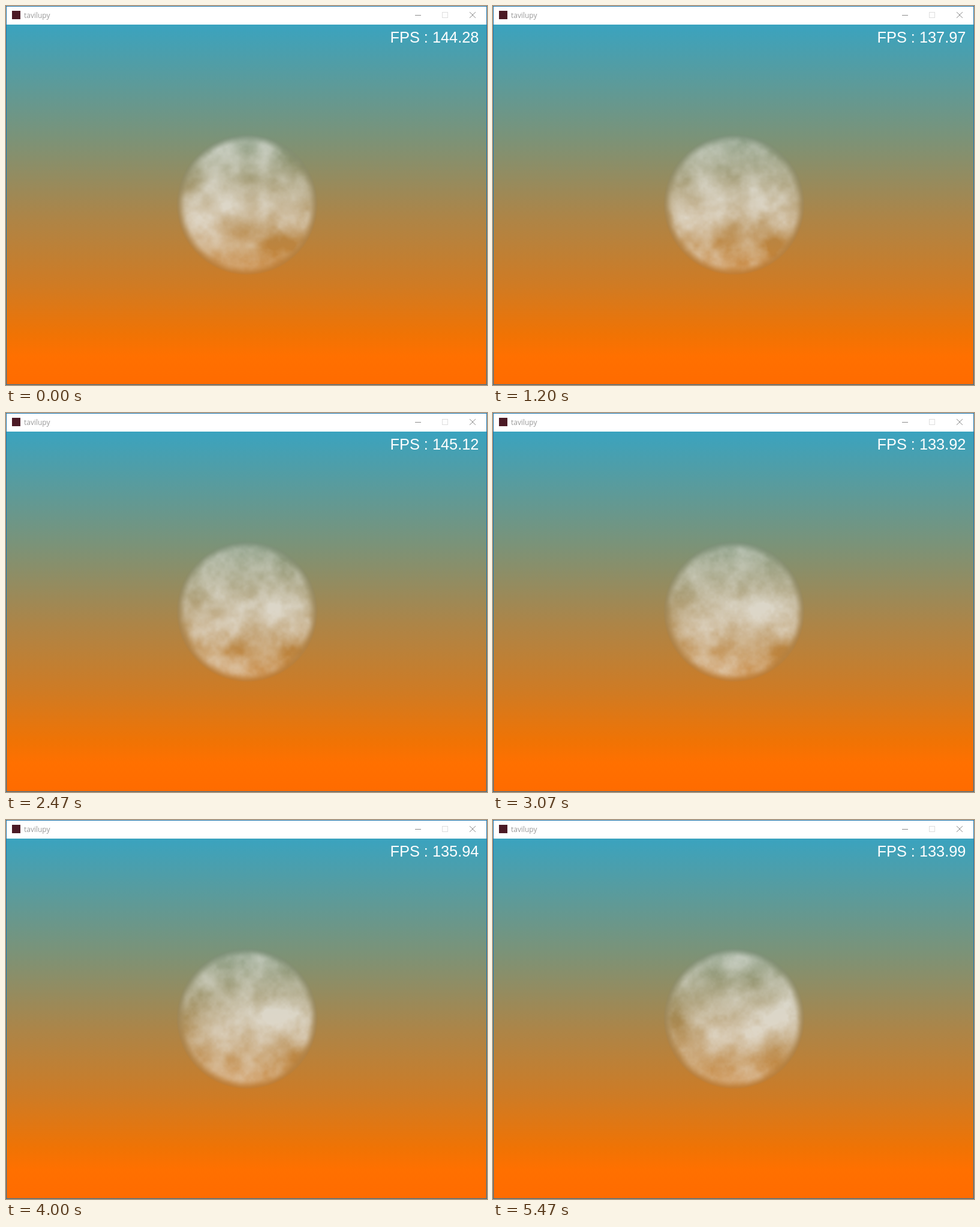
An HTML page with a canvas for the animation above (5540 ms loop, 802 by 632 pixels).

```html
<!DOCTYPE html>
<html lang="en">
<head>
<meta charset="utf-8">
<title>Cloud sphere</title>
<style>
  html, body { margin: 0; width: 100%; height: 100%; overflow: hidden; background: #fff; }
  svg, canvas { position: absolute; display: block; }
  svg { left: 0; top: 0; }
  canvas { left: 283px; top: 212px; }
</style>
</head>
<body>
<svg width="802" height="632" viewBox="0 0 802 632">
  <defs>
    <linearGradient id="sky" gradientUnits="userSpaceOnUse" x1="0" y1="31" x2="0" y2="632">
      <stop offset="0" stop-color="#3aa3bf"/>
      <stop offset=".31" stop-color="#7a9379"/>
      <stop offset=".53" stop-color="#ac8548"/>
      <stop offset=".72" stop-color="#cf7b24"/>
      <stop offset=".86" stop-color="#f07304"/>
      <stop offset=".92" stop-color="#ff7000"/>
      <stop offset="1" stop-color="#ff6b00"/>
    </linearGradient>
  </defs>
  <rect width="802" height="632" fill="#fff"/>
  <rect y="31" width="802" height="601" fill="url(#sky)"/>
  <rect x=".5" y=".5" width="801" height="631" fill="none" stroke="#1a74ae"/>
  <rect x="10" y="8" width="14" height="14" fill="#4b1a25"/>
  <text x="30" y="20" font-family="'Open Sans', sans-serif" font-size="12" fill="#999">tavilupy</text>
  <g fill="none" stroke="#8c8c8c">
    <path d="M682 15.5h10"/>
    <rect x="727.5" y="10.5" width="9" height="9" stroke="#dedede"/>
    <path d="M773 10l10 10M783 10l-10 10"/>
  </g>
  <text id="fps" x="788.4" y="61" text-anchor="end" font-family="'Liberation Sans', Arial, sans-serif" font-size="25.33" fill="#fff"></text>
</svg>
<canvas id="cloud" width="238" height="238"></canvas>
<script>
const LOOP = 5540, STEP = 200 / 3, STEPS = 83;
const SIZE = 238, MID = SIZE / 2, RADIUS = 118;

// Counter readings, refreshed every half second.
const rates = [144.28, 141.36, 137.97, 139.45, 142.63, 145.12,
               133.92, 137.08, 135.94, 133.84, 134.64, 133.99];

// Thick and thin patches, placed from the sphere's centre, gliding over one loop.
const patches = [
  { from: [-6, -3],   to: [60, 4],    r: 42, w: .3 },
  { from: [-72, 12],  to: [-14, 26],  r: 38, w: .18 },
  { from: [-40, -66], to: [-64, -62], r: 32, w: .14 },
  { from: [82, -4],   to: [94, -10],  r: 28, w: .2 },
  { from: [-8, 46],   to: [-30, 74],  r: 22, w: -.28 },
  { from: [0, -38],   to: [-34, -56], r: 24, w: -.2 },
  { from: [-92, -46], to: [-86, 6],   r: 26, w: -.22 },
  { from: [78, -76],  to: [70, -92],  r: 36, w: -.3 },
  { from: [56, 66],   to: [72, 80],   r: 34, w: -.28 }
];

const clamp = (v, a, b) => Math.min(b, Math.max(a, v));
const mix = (a, b, k) => a + (b - a) * k;
const smooth = k => k * k * (3 - 2 * k);

// Seeded lattice for smooth 3D noise.
let seed = 4217;
const random = () => (seed = (seed * 16807) % 2147483647) / 2147483647;
const lattice = Float32Array.from({ length: 4096 }, random);
const cell = (x, y, z) => lattice[(x & 15) | (y & 15) << 4 | (z & 15) << 8];

function noise(x, y, z) {
  const i = Math.floor(x), j = Math.floor(y), k = Math.floor(z);
  const u = smooth(x - i), v = smooth(y - j), w = smooth(z - k);
  const layer = n => mix(
    mix(cell(i, j, n), cell(i + 1, j, n), u),
    mix(cell(i, j + 1, n), cell(i + 1, j + 1, n), u), v);
  return mix(layer(k), layer(k + 1), w);
}

function fbm(x, y, z) {
  let sum = 0, gain = .5;
  for (let o = 0; o < 4; o++) {
    sum += gain * (noise(x, y, z) - .5);
    x = x * 2.03 + 5.3;
    y = y * 2.03 + 1.7;
    z = z * 1.4 + 3.1;
    gain *= .5;
  }
  return sum;
}

// Pixels inside the sphere, with their fade towards the rim.
const pixels = [];
for (let row = 0; row < SIZE; row++) {
  for (let col = 0; col < SIZE; col++) {
    const x = col + .5 - MID, y = row + .5 - MID, inset = RADIUS - Math.hypot(x, y);
    if (inset < 0) continue;
    pixels.push({
      x, y, at: (row * SIZE + col) * 4,
      body: smooth(clamp(inset / 17, 0, 1)),
      rim: clamp(inset / 3, 0, 1)
    });
  }
}

const ctx = document.getElementById('cloud').getContext('2d');
const image = ctx.createImageData(SIZE, SIZE);
const fps = document.getElementById('fps');

function drawCloud(t) {
  const k = t / LOOP, z = t / 1800;
  const spots = patches.map(({ from, to, r, w }) =>
    ({ x: mix(from[0], to[0], k), y: mix(from[1], to[1], k), rr: r * r, w }));
  for (const p of pixels) {
    let density = .42 + .8 * fbm(p.x / 32 - k, p.y / 32, z);
    for (const s of spots) {
      const e = ((p.x - s.x) ** 2 + (p.y - s.y) ** 2) / s.rr;
      if (e < 5) density += s.w * Math.exp(-e);
    }
    const cover = clamp(density, .04, .8) * p.body;
    const edge = .13 * (1 - p.body) * p.rim;
    const alpha = cover + edge;
    const grey = alpha ? (cover * 234 + edge * 125) / alpha : 0;
    image.data[p.at] = grey;
    image.data[p.at + 1] = grey;
    image.data[p.at + 2] = grey - 4;
    image.data[p.at + 3] = alpha * 255;
  }
  ctx.putImageData(image, 0, 0);
}

// Steps last a fifteenth of a second, rounded to 10 ms.
const stepStart = n => Math.round(n * STEP / 10) * 10;
function stepAt(t) {
  const n = Math.min(STEPS - 1, Math.floor((t + 4) / STEP));
  return stepStart(n) > t ? n - 1 : n;
}

const start = performance.now();
let shown = -1;
function render() {
  const step = stepAt((performance.now() - start) % LOOP);
  if (step !== shown) {
    shown = step;
    const t = stepStart(step);
    fps.textContent = 'FPS : ' + rates[Math.floor((t + 30) / 500)].toFixed(2);
    drawCloud(t);
  }
  requestAnimationFrame(render);
}
render();
</script>
</body>
</html>
```
